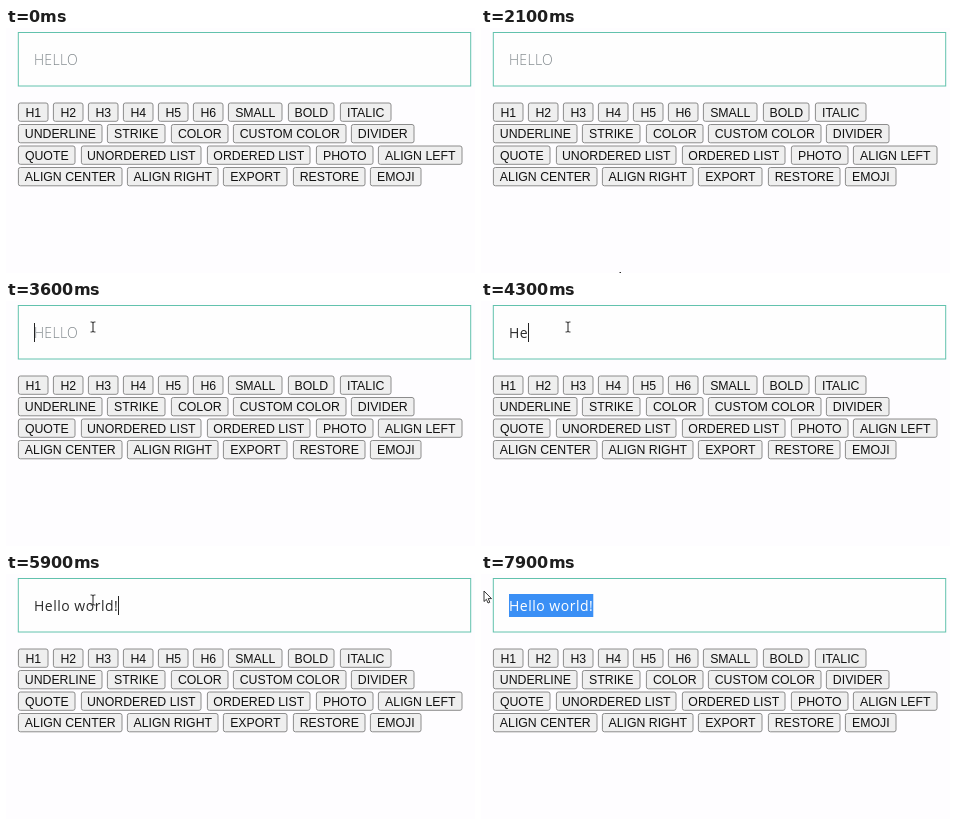
These frames come from a looping animation (469 by 245 pixels, 8 s). An HTML page:

```html
<!DOCTYPE html>
<html lang="en">
<head>
<meta charset="utf-8">
<title>Text editor demo</title>
<style>
  html, body { margin: 0; width: 100%; height: 100%; overflow: hidden; background: #fefdff; }
  svg { display: block; width: 469px; height: 245px; }
  .btn rect { fill: #efefef; stroke: #8c8c8c; }
  .btn text { font: 12.3px "Liberation Sans", Arial, sans-serif; text-anchor: middle; fill: #111; }
  .edit { font: 14px "Open Sans", "Noto Sans", sans-serif; letter-spacing: .5px; white-space: pre; }
  #hint { font-weight: 300; letter-spacing: .3px; fill: #7c8488; }
  #line { fill: #2b2b2b; }
  #picked { fill: #fff; }
</style>
</head>
<body>
<svg viewBox="0 0 469 245">
  <rect x="12.3" y="4.5" width="452.4" height="53.5" fill="#fefefe" stroke="#62c2ad"/>
  <g id="buttons"></g>
  <rect id="mark" y="20" height="23" fill="#3a8ff5"/>
  <text id="hint" class="edit" x="28" y="37">HELLO</text>
  <text id="line" class="edit" x="28" y="37"><tspan id="plain"></tspan><tspan id="picked"></tspan></text>
  <rect id="caret" y="22" width="1" height="19" fill="#222"/>
  <g id="beam" fill="none">
    <path d="M-2.5-5H-1L0-4 1-5H2.5M0-4V4M-2.5 5H-1L0 4 1 5H2.5" stroke="#444" stroke-width="1.2"/>
  </g>
  <g id="arrow">
    <path d="M0 0V10.5L2.4 8.3 4 12 5.8 11.2 4.2 7.6H7.5Z" fill="#fff" stroke="#222" stroke-width=".9"/>
    <g id="busy"><circle cx="8.5" cy="0" r="4.8" fill="#1e7fd8"/><circle cx="8.5" cy="0" r="1.8" fill="#d5eaff"/></g>
  </g>
</svg>
<script>
const $ = id => document.getElementById(id);
const LOOP = 8000, LEFT = 28, TEXT = 'Hello world!';

// Each button: label, left edge, right edge
const rows = [
  [['H1', 12, 43], ['H2', 47, 78], ['H3', 82, 113], ['H4', 117, 148], ['H5', 152, 183], ['H6', 187, 218],
   ['SMALL', 222, 277], ['BOLD', 282, 329], ['ITALIC', 334, 386]],
  [['UNDERLINE', 12, 97], ['STRIKE', 101, 160], ['COLOR', 165, 223], ['CUSTOM COLOR', 227, 341], ['DIVIDER', 345, 409]],
  [['QUOTE', 12, 70], ['UNORDERED LIST', 75, 196], ['ORDERED LIST', 201, 305], ['PHOTO', 310, 368], ['ALIGN LEFT', 372, 457]],
  [['ALIGN CENTER', 12, 117], ['ALIGN RIGHT', 121, 213], ['EXPORT', 217, 282], ['RESTORE', 287, 360], ['EMOJI', 364, 416]]
];
$('buttons').innerHTML = rows.map((row, i) => {
  const y = 75 + i * 21.5;
  return row.map(([label, a, b]) =>
    `<g class="btn"><rect x="${a + .4}" y="${y}" width="${b - a - 1.4}" height="18.3" rx="2"/>` +
    `<text x="${(a + b) / 2 - .2}" y="${y + 13.5}">${label}</text></g>`).join('');
}).join('');

// Pointer path: time, x, y
const path = [
  [1000, 156, -16], [1200, 153, 2], [1400, 152, 60], [1750, 148, 250], [2050, 140, 250],
  [2500, 110, 70], [2750, 103, 35], [2950, 103, 35], [3250, 94, 16], [3550, 87, 26],
  [6450, 87, 26], [6750, 121, 41], [6950, 121, 41], [7250, 116, 33], [7700, 3, 17]
];
function pointer(t) {
  const i = path.findIndex(p => p[0] > t);
  if (i < 1) return (i ? path[path.length - 1] : path[0]).slice(1);
  const [t0, x0, y0] = path[i - 1], [t1, x1, y1] = path[i];
  const u = (t - t0) / (t1 - t0), e = u * u * (3 - 2 * u);
  return [x0 + (x1 - x0) * e, y0 + (y1 - y0) * e];
}

const line = $('line');
const edge = n => LEFT + (n ? line.getSubStringLength(0, n) : 0);
const show = (id, on) => $(id).setAttribute('visibility', on ? 'visible' : 'hidden');

function draw(t) {
  const typed = Math.max(0, Math.min(TEXT.length, Math.floor((t - 3990) / 150)));
  const [x, y] = pointer(t);

  $('plain').textContent = TEXT.slice(0, typed);
  $('picked').textContent = '';
  const end = edge(typed);
  let from = typed;
  if (t > 7250) while (from && (edge(from) + edge(from - 1)) / 2 > x) from--;
  const start = edge(from);
  $('plain').textContent = TEXT.slice(0, from);
  $('picked').textContent = TEXT.slice(from, typed);
  $('mark').setAttribute('x', start);
  $('mark').setAttribute('width', end - start);

  show('hint', !typed);
  const lastKey = t < 4140 ? 3450 : 3990 + typed * 150;
  show('caret', t >= 3450 && t < 6950 && (t - lastKey) % 1060 < 530);
  $('caret').setAttribute('x', Math.round(end));

  const inEditor = x > 12 && y > 5 && y < 58 && t > 2000;
  show('beam', inEditor);
  show('arrow', !inEditor && t >= 1000);
  $('busy').setAttribute('display', t < 1800 ? 'inline' : 'none');
  for (const id of ['beam', 'arrow'])
    $(id).setAttribute('transform', `translate(${Math.round(x)} ${Math.round(y)})`);
}

function tick() {
  draw(performance.now() % LOOP);
  requestAnimationFrame(tick);
}
tick();
</script>
</body>
</html>
```
